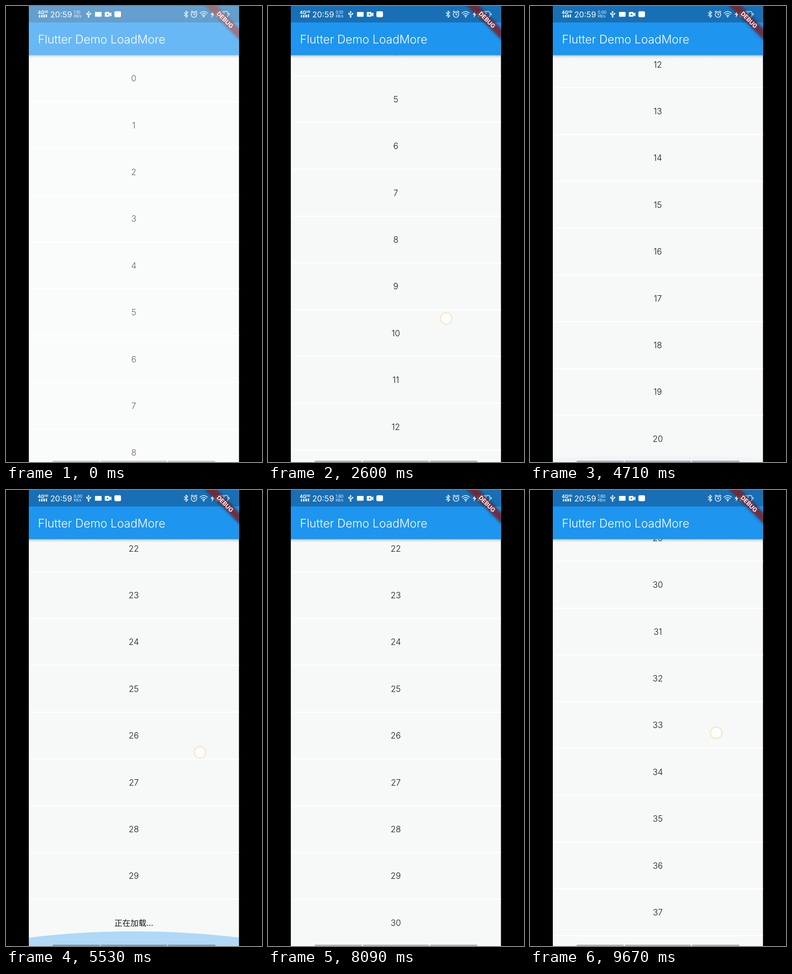
These frames come from a looping animation (561 by 998 pixels, 9730 ms). An HTML page:

```html
<!DOCTYPE html>
<html lang="en">
<head>
<meta charset="utf-8">
<title>Load more list</title>
<style>
  html, body { margin: 0; width: 100%; height: 100%; overflow: hidden; background: #000; }
  svg { display: block; width: 100vw; height: 100vh; font-family: Inter, "Noto Sans CJK SC", sans-serif; }
  .row { font-size: 18.4px; font-weight: 300; fill: #161616; text-anchor: middle; }
  .loading { font-size: 17.6px; font-weight: 400; font-family: "Noto Sans CJK SC", "Noto Sans CJK", sans-serif; }
  .line { fill: none; stroke: #fff; stroke-width: 1.5; stroke-linecap: round; stroke-linejoin: round; }
</style>
</head>
<body>
<svg viewBox="0 0 561 998">
  <defs>
    <clipPath id="phone"><rect x="50" width="460.5" height="998"/></clipPath>
    <linearGradient id="shadow" x2="0" y2="1">
      <stop stop-color="#000" stop-opacity=".3"/>
      <stop offset=".4" stop-color="#000" stop-opacity=".1"/>
      <stop offset="1" stop-color="#000" stop-opacity="0"/>
    </linearGradient>
    <filter id="blur" x="-20%" y="-100%" width="140%" height="300%"><feGaussianBlur stdDeviation="3.5"/></filter>
  </defs>
  <rect width="561" height="998"/>
  <g clip-path="url(#phone)">
    <rect x="50" width="461" height="998" fill="#f7f9f8"/>
    <g id="list"></g>
    <ellipse id="glow" cx="280.3" rx="690" fill="#2196f3"/>

    <rect x="50" y="107" width="461" height="8" fill="url(#shadow)"/>
    <rect x="50" y="36" width="461" height="71.5" fill="#1e95ef"/>
    <rect x="50" width="461" height="36" fill="#186fb5"/>
    <text x="70" y="82.3" font-size="25.4" font-weight="300" fill="#fff" id="title">Flutter Demo LoadMore</text>

    <!-- Status bar, left -->
    <g fill="#fff">
      <text x="69.5" y="17.5" font-size="10" font-weight="700">4G<tspan font-size="6" dy="-2.5">HD</tspan></text>
      <path d="M72 20h3v5h-3zM77 19.5h3v5.5h-3zM82 19h3v6h-3zM87 18.5h3v6.5h-3z"/>
      <text x="97" y="24.8" font-size="17.4">20:59</text>
      <text id="speed" x="148.5" y="17" font-size="8.8"></text>
      <text x="148.5" y="25.3" font-size="7.6">KB/s</text>
      <path d="M181 10.5l2.3 3.5h-4.6zM176 15h3v3h-3z"/>
      <circle cx="181" cy="23.6" r="1.9"/>
      <circle cx="185.2" cy="16.2" r="1.5"/>
      <rect x="195" y="13" width="14.5" height="10.5" rx="1"/>
      <path d="M218 13h7.500q1.500 0 1.500 1.500v2l4-2.500v9l-4-2.500v1.500q0 1.500-1.500 1.500h-7.500q-1.500 0-1.500-1.500v-7.500q0-1.500 1.500-1.500z"/>
      <rect x="237.500" y="11.500" width="14.500" height="13" rx="3"/>
    </g>
    <path class="line" stroke-width="1.2" d="M181 13v10M177.500 17v1.500l3.500 2.500M185.200 16.500v1.500l-4.200 2"/>
    <path d="M221 16l4 2.300-4 2.300z" fill="#186fb5"/>

    <!-- Status bar, right -->
    <path class="line" d="M390.500 14.500l8 7-4 3.500v-14l4 3.500-8 7"/>
    <circle class="line" cx="412" cy="18.800" r="6"/>
    <path class="line" d="M412 15.500v3.700h2.500M405.500 13l2.800-2.200M418.500 13l-2.800-2.200M425 15.500q8.200-7 16.400 0M427.800 18.500q5.400-4.600 10.800 0M430.500 21.300q2.700-2.200 5.400 0"/>
    <circle cx="433.200" cy="23.600" r="1.500" fill="#fff"/>
    <path d="M454 11l-5.500 8h3.500l-1.200 6.500 6-8.500h-3.700z" fill="#fff"/>
    <rect class="line" x="460" y="12" width="26.500" height="12" rx="3.500" opacity=".85"/>
    <path class="line" d="M489 16.500v3"/>
    <text x="473.300" y="22" font-size="10.500" font-weight="600" fill="#fff" text-anchor="middle">67</text>

    <g transform="translate(480 30.300) rotate(45)">
      <rect x="-60" y="-7.700" width="120" height="15.400" opacity=".55" filter="url(#blur)"/>
      <rect x="-60" y="-7.700" width="120" height="15.400" fill="#a32228" fill-opacity=".65"/>
      <text y="4.700" font-size="13" font-weight="700" fill="#fff" text-anchor="middle">DEBUG</text>
    </g>

    <path d="M102 998v-1.500q0-1.500 1.500-1.500h102v3zM208 995h144.500v3h-144.500zM355 995h102.500q1.500 0 1.500 1.500v1.500h-104z" fill-opacity=".28"/>
    <circle id="touch" r="12.600" fill="#fff" fill-opacity=".85" stroke="#f8e5c8" stroke-width="2.600"/>
    <rect id="fade" x="50" width="461" height="998" fill="#fff"/>
  </g>
</svg>
<script>
const LOOP = 9730, ROW = 102.4, FIRST = 158.5, BOTTOM = 998;
const $ = id => document.getElementById(id);

const END1 = 235.4, END2 = END1 + 10 * ROW, END3 = END2 + 10 * ROW;
const scrollKeys = [
  [0, 0], [560, 0], [930, 208], [980, END1],
  [2530, END1], [2600, 462.5], [2800, END2],
  [5290, END2], [5480, END3],
  [8930, END3], [9080, 2520], [9300, 2800], [9560, 2895], [9670, 3023]
];
// Each touch: time, x, y at the start and at the end.
const touches = [
  [[560, 378, 916], [930, 385.5, 708], [980, 386, 681]],
  [[2530, 384, 914], [2600, 390.5, 687], [2640, 394, 560]],
  [[5290, 395, 900], [5530, 425, 574.5], [5560, 426, 560]],
  [[8930, 390, 880], [9080, 402, 643]],
  [[9560, 400, 660], [9670, 408, 531.5], [LOOP, 408, 531.5]]
];
const glows = [
  { start: 1000, size: .4, alpha: .33, until: 1710 },
  { start: 2800, size: .9, alpha: .25, until: 5290, freeze: 3220 },
  { start: 5430, size: .4, alpha: .38, until: 6090 }
];
const loads = [1870, 4670, 7400];
const speeds = [[0, "1.10"], [780, "0.10"], [3780, "0.00"], [6820, "1.60"]];

function sample(keys, t, column = 1) {
  const i = keys.findIndex(k => k[0] > t);
  if (i < 0) return keys.at(-1)[column];
  const a = keys[Math.max(i - 1, 0)], b = keys[i];
  return a === b ? a[column] : a[column] + (b[column] - a[column]) * (t - a[0]) / (b[0] - a[0]);
}

function make(name, attributes, parent) {
  const node = document.createElementNS("http://www.w3.org/2000/svg", name);
  for (const key in attributes) node.setAttribute(key, attributes[key]);
  return parent.appendChild(node);
}

function set(node, attributes) {
  for (const key in attributes) node.setAttribute(key, attributes[key]);
}

const rows = Array.from({ length: 11 }, () => {
  const group = make("g", {}, $("list"));
  make("rect", { x: 50, y: 50, width: 461, height: 2, fill: "#fff" }, group);
  return { group, label: make("text", { x: 280, y: 6.7 }, group) };
});

function drawList(t) {
  const scroll = sample(scrollKeys, t);
  const count = 10 * (1 + loads.filter(time => t >= time).length);
  const first = Math.max(0, Math.floor(scroll / ROW) - 1);
  rows.forEach(({ group, label }, i) => {
    const index = first + i, loading = index === count;
    set(group, {
      transform: `translate(0 ${FIRST + index * ROW - scroll})`,
      visibility: index > count ? "hidden" : "visible"
    });
    label.textContent = loading ? "正在加载..." : index;
    label.setAttribute("class", loading ? "row loading" : "row");
  });
}

function drawGlow(t) {
  const glow = glows.find(g => t >= g.start && t < g.until);
  let level = 0;
  if (glow) {
    const age = Math.min(t, glow.freeze ?? t) - glow.start;
    level = age < 60 ? age / 60 : Math.max(0, 1 - (age - 60) / 600) ** 2;
  }
  const size = glow ? glow.size * level : 0;
  set($("glow"), {
    cy: BOTTOM + (690 - 92.4) * size,
    ry: 690 * size,
    opacity: glow ? glow.alpha * level : 0
  });
}

function drawTouch(t) {
  const path = touches.find(p => t >= p[0][0] && t < p.at(-1)[0]);
  $("touch").setAttribute("visibility", path ? "visible" : "hidden");
  if (path) set($("touch"), { cx: sample(path, t, 1), cy: sample(path, t, 2) });
}

function draw(t) {
  drawList(t);
  drawGlow(t);
  drawTouch(t);
  $("speed").textContent = speeds.findLast(s => t >= s[0])[1];
  $("fade").setAttribute("opacity", .33 * Math.max(0, 1 - Math.max(0, t - 20) / 330));
}

const began = performance.now();
function frame() {
  draw((performance.now() - began) % LOOP);
  requestAnimationFrame(frame);
}
frame();
</script>
</body>
</html>
```
